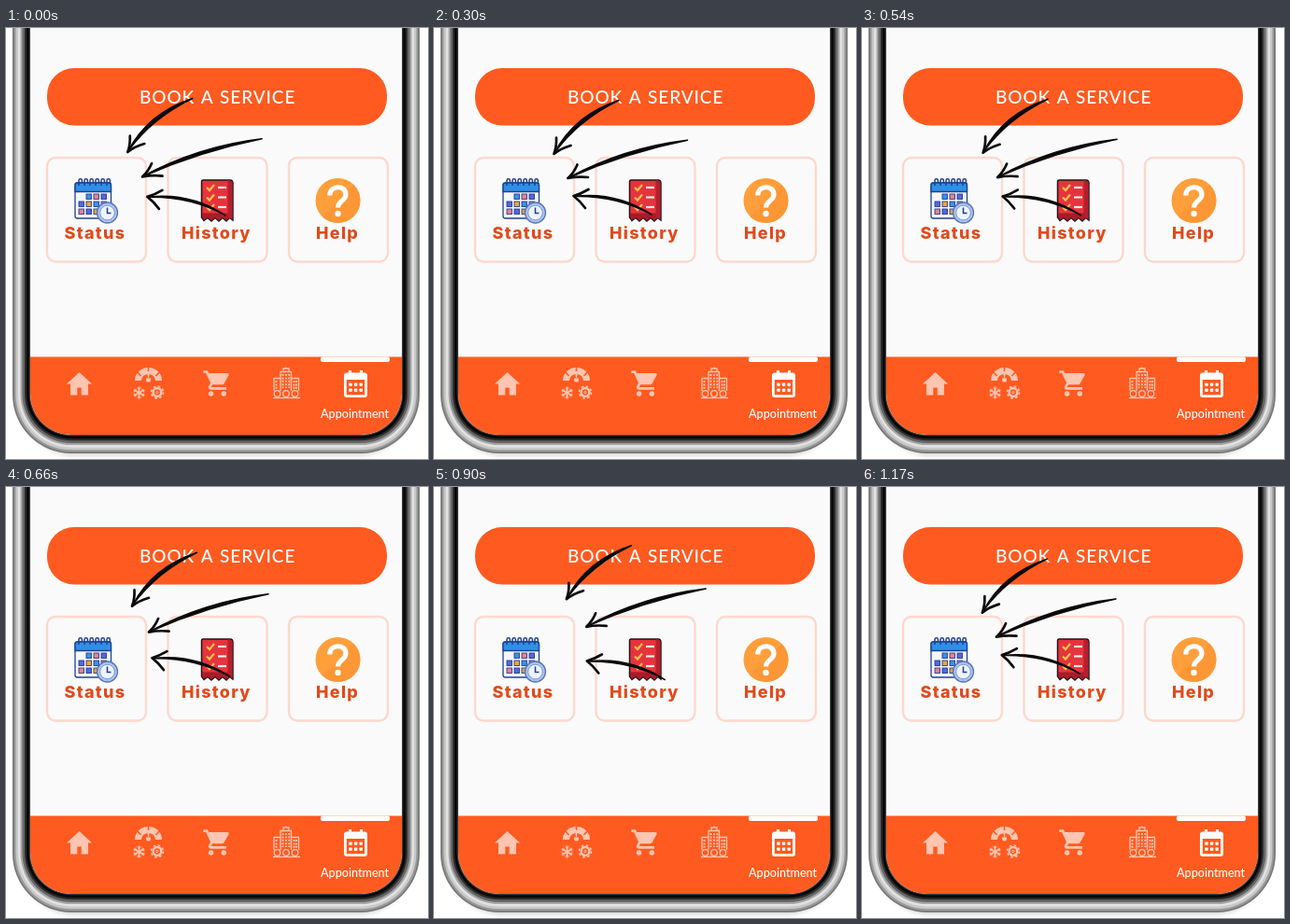
Write an HTML page that moves like this. It is 452x462 px and loops after 1200 ms.

```html
<!DOCTYPE html>
<html lang="en">
<head>
<meta charset="utf-8">
<title>Appointment screen</title>
<style>
html, body { margin: 0; width: 100%; height: 100%; overflow: hidden; background: #fff; }
svg { display: block; width: 452px; height: 462px; }
.label { font: 800 18px Inter, sans-serif; letter-spacing: 1.3px; fill: #e04a1b; }
.button { font: 500 19px Lato, sans-serif; letter-spacing: .9px; word-spacing: 1.5px; fill: #fff; }
.tab { font: 500 12.6px Lato, sans-serif; fill: #fff; }
</style>
</head>
<body>
<svg viewBox="0 0 452 462" xmlns="http://www.w3.org/2000/svg">
  <defs>
    <clipPath id="screen"><rect x="26" y="-60" width="398" height="496" rx="44"/></clipPath>
    <filter id="soft"><feGaussianBlur stdDeviation="2"/></filter>
  </defs>

  <rect x="12" y="-60" width="426" height="519" rx="62" fill="#bbb" opacity=".5" filter="url(#soft)"/>
  <g id="frame"></g>

  <g clip-path="url(#screen)">
    <rect x="26" y="0" width="398" height="436" fill="#fafafa"/>
    <rect x="26" y="352.500" width="398" height="84" fill="#ff5a20"/>
  </g>
  <rect x="337" y="352.500" width="74" height="5.500" rx="2" fill="#fff"/>

  <rect x="44" y="43" width="364" height="61.500" rx="29" fill="#ff5a20"/>
  <text class="button" x="143" y="80.500">BOOK A SERVICE</text>

  <g id="cards" fill="#fafafa" stroke="#fdd8cd" stroke-width="2.400"></g>
  <text class="label" x="62.500" y="226">Status</text>
  <text class="label" x="188" y="226">History</text>
  <text class="label" x="332" y="226">Help</text>

  <!-- status -->
  <g stroke="#20408f" stroke-width="1.300">
    <rect x="74" y="166" width="38.500" height="38" rx="2.500" fill="#f4f7ff"/>
    <path d="M74 175.500V168.500Q74 166 76.500 166H110Q112.500 166 112.500 168.500V175.500Z" fill="#2f8fe6"/>
    <g id="rings" fill="none" stroke-width="1.500"></g>
    <g id="days" stroke-width=".9"></g>
    <circle cx="108.500" cy="198" r="11" fill="#a9c4f0" stroke="#5674b4"/>
    <circle cx="108.500" cy="198" r="7.800" fill="#eef4ff" stroke="#7d9bd3" stroke-width="1"/>
    <path d="M108.500 192.500V198.500H112.500" fill="none" stroke-width="1.500"/>
  </g>

  <!-- history -->
  <path d="M211 163H240Q243 163 243 166.500V206L239.500 203.500 236 207 232 203.500 228 207 224 203.500 220 207 216 203.500 212 206.500 209.500 203V165Q209.500 163 211 163Z" fill="#e5343d" stroke="#231418" stroke-width="1.500"/>
  <path d="M237.500 163.500H240Q242.500 164 242.500 167V205L237.500 203Z" fill="#b51f2d"/>
  <path d="M210 198.500H238V203L236 206 232 203 228 206 224 203 220 206 216 203 212 205.500 210 202Z" fill="#a91b29"/>
  <g id="checks" fill="none" stroke-width="2.200"></g>

  <!-- help -->
  <circle cx="355.500" cy="185" r="24" fill="#ff9f3b"/>
  <path d="M372.500 168A24 24 0 0 1 338.500 202Z" fill="#fb9030" opacity=".55"/>
  <path d="M346.800 179.500C346.800 168 364 168 364 178.500 364 185.500 355.500 185 355.500 192.500" fill="none" stroke="#fff" stroke-width="5.200"/>
  <circle cx="355.500" cy="199" r="3.200" fill="#fff"/>

  <!-- tab bar -->
  <g fill="#ffc5b1">
    <path d="M78.500 369 65 381.500H69V393.500H76.300V385.500H80.700V393.500H88V381.500H92Z"/>
    <path transform="translate(210 364.500) scale(1.370)" d="M7 18a2 2 0 1 0 0 4 2 2 0 0 0 0-4zM1 2v2h2l3.600 7.590-1.350 2.450C4.500 15.500 5.500 17 7 17h12v-2H7.420l-.22-.37.9-1.630h7.450c.75 0 1.410-.41 1.750-1.030l3.580-6.490Q21.200 4 20 4H5.210l-.94-2H1zM17 18a2 2 0 1 0 0 4 2 2 0 0 0 0-4z"/>
    <path d="M138 378A14.500 14 0 0 1 167 378L160 378A7.500 7 0 0 0 145 378Z"/>
    <circle cx="152.500" cy="377" r="2.600"/>
  </g>
  <path d="M152.500 376V364M144.500 373 139 367M160.500 373 166 367" stroke="#ff5a20" stroke-width="1.600"/>
  <path d="M152.500 377 150.800 368 154.200 368Z" fill="#ffc5b1"/>
  <g id="flake" stroke="#ffc5b1" stroke-width="1.900"></g>
  <g fill="none" stroke="#ffc5b1">
    <circle cx="162" cy="390.500" r="4.400" stroke-width="2.500"/>
    <circle cx="162" cy="390.500" r="6.500" stroke-width="1.600" stroke-dasharray="2.500 2.605"/>
    <circle cx="162" cy="390.500" r="1.200" stroke-width="1"/>
    <g stroke-width="1.300">
      <path d="M287 389V375.500H294V389M294 389V368.500H305.500V389M305.500 375.500H313.500V389M297 368V365H303V368M300 365V363.500"/>
      <path d="M296.500 371V386M300 371V386M303.300 371V386M289.500 378V387M308.500 378V387M311 378V387" stroke-dasharray="2 1.400" stroke-width="1.900"/>
      <path d="M286 396.500H315"/>
      <circle cx="290.500" cy="392" r="3.300"/>
      <circle cx="300" cy="392" r="3.300"/>
      <circle cx="309.500" cy="392" r="3.300"/>
    </g>
  </g>
  <g fill="#fff">
    <path fill-rule="evenodd" d="M365 369.500H367V367H370V369.500H379V367H382V369.500H384Q387 369.500 387 372.500V393Q387 396 384 396H365Q362 396 362 393V372.500Q362 369.500 365 369.500ZM364.800 377V393.300H384.200V377Z"/>
    <g id="dots"></g>
  </g>
  <text class="tab" x="337" y="418">Appointment</text>

  <g id="arrows" fill="#0a0a0a" stroke="#0a0a0a" stroke-linecap="round" stroke-linejoin="round"></g>
</svg>
<script>
const $ = id => document.getElementById(id);
const fill = (id, items, draw) => { $(id).innerHTML = items.map(draw).join(''); };
const range = n => [...Array(n).keys()];

// Bezel: nested rounded rectangles, [inset, colour]
fill('frame', [[0, '#737373'], [1.5, '#989898'], [3.5, '#c9c9c9'], [6, '#e2e2e2'], [8.5, '#a5a5a5'],
  [10.5, '#666'], [13, '#2a2a2a'], [15, '#080808'], [17.8, '#444']], ([i, c]) =>
  `<rect x="${7 + i}" y="-60" width="${436 - 2 * i}" height="${516 - i * 1.05}" rx="${63 - i}" fill="${c}"/>`);

fill('cards', [44, 173.5, 303], x => `<rect x="${x}" y="139" width="106" height="111.5" rx="9"/>`);

fill('rings', range(6), i =>
  `<path d="M${78 + i * 6} 169V163.500a1.700 1.700 0 0 1 3.400 0V166"/>`);

const tints = ['#f5a13a', '#3f8ee8', '#ef7f8c', '#5a66d8'];
fill('days', range(11), n => {
  const i = n + 1, col = i % 4, row = i >> 2;
  return `<rect x="${78 + col * 8}" y="${178 + row * 8}" width="5.500" height="5.500" fill="${tints[(col + row * 3) % 4]}"/>`;
});

fill('checks', [171, 181.5, 192], y =>
  `<path d="M215 ${y} l3 3 5-6" stroke="#ffc34d"/><path d="M227 ${y}h9" stroke="#ffe9e4"/>`);

fill('flake', [0, 60, 120], a =>
  `<path transform="rotate(${a} 142.500 391)" d="M142.500 384.500V397.500" />` +
  `<path transform="rotate(${a} 142.500 391)" d="M140.500 385.500 142.500 387.500 144.500 385.500M140.500 396.500 142.500 394.500 144.500 396.500" fill="none" stroke-width="1"/>`);

fill('dots', range(6), i =>
  `<rect x="${367.3 + i % 3 * 5.6}" y="${380.5 + (i / 3 | 0) * 6}" width="3.400" height="3.400" rx=".8"/>`);

const arrows = [
  { shaft: 'M198 77.500Q150.500 93 129 134Q154.500 98.500 198 77.500Z', head: 'M131 117.500Q131.500 127 128.500 135Q136 129 146.500 126', move: [15, -16.500] },
  { shaft: 'M271.500 120.300Q204 128 143 161Q206 133.500 271.500 120.300Z', head: 'M153.500 146.500Q150 155 143.500 161Q153 159 165 160', move: [22, -12.500] },
  { shaft: 'M233 200Q196 179.500 150 180.500Q195 175 233 200Z', head: 'M165.500 173Q157 178 149.500 180Q156 185 162 193', move: [16, 7.300] }
];
fill('arrows', arrows, a =>
  `<g><path d="${a.shaft}" stroke-width="1.500"/><path d="${a.head}" fill="none" stroke-width="2.700"/></g>`);
const parts = [...$('arrows').children];

const LOOP = 1200, STEP = 30, BEAT = 1086, PEAK = 826, WIDTH = 175;

// Outward swing of the arrows; the loop is slightly longer than one beat
function swing(t) {
  const d = Math.min(Math.abs(t - PEAK), t + BEAT - PEAK);
  return 1.07 * Math.exp(-((d / WIDTH) ** 2));
}

function render(now) {
  const s = swing(Math.floor(now % LOOP / STEP) * STEP);
  arrows.forEach(({ move: [x, y] }, i) =>
    parts[i].setAttribute('transform', `translate(${(x * s).toFixed(2)} ${(y * s).toFixed(2)})`));
}

let start;
function tick(now) {
  start ??= now;
  render(now - start);
  requestAnimationFrame(tick);
}
render(0);
requestAnimationFrame(tick);
</script>
</body>
</html>
```
